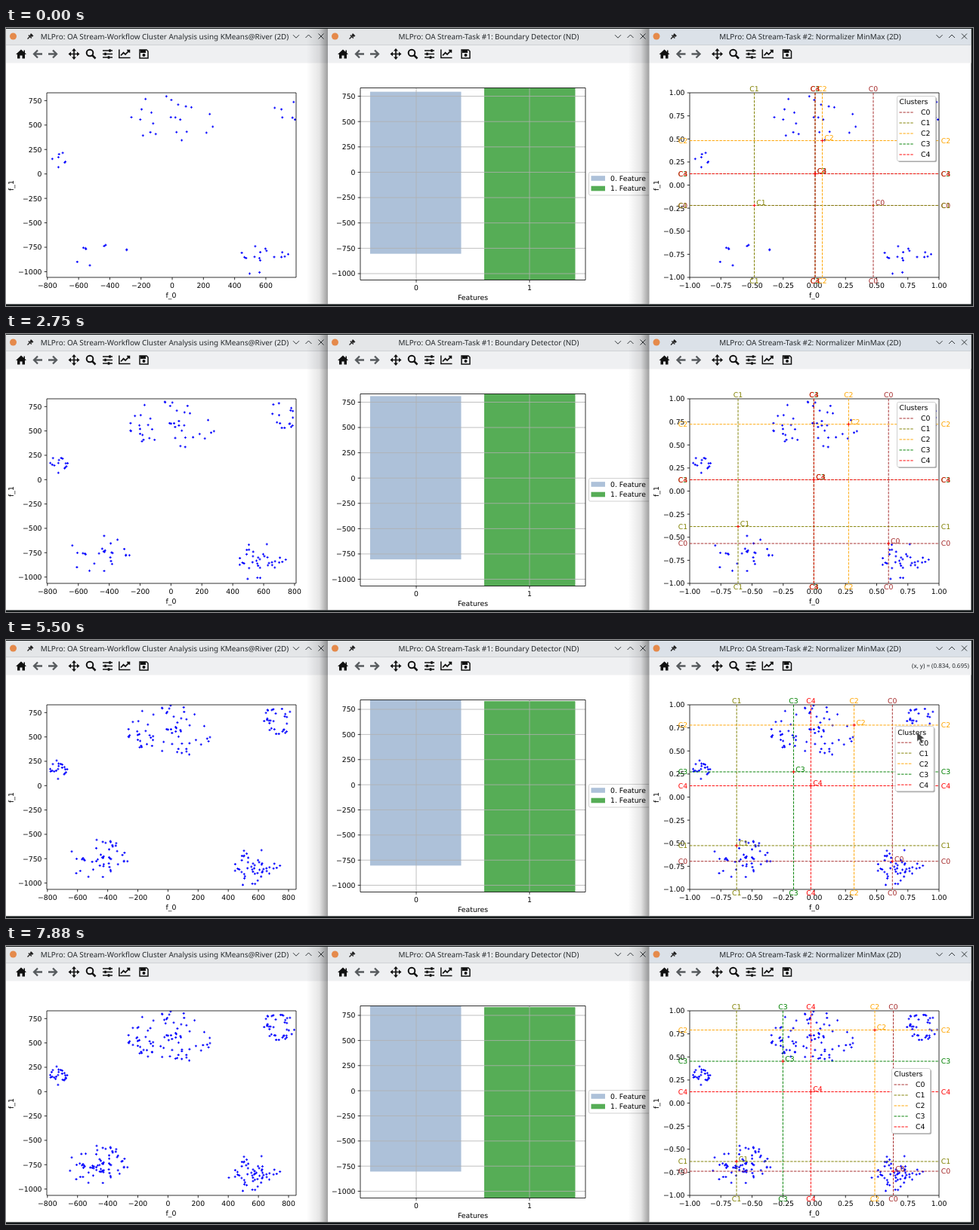
These frames come from a looping animation (1280x369 px, 8000 ms). An HTML page:

```html
<!DOCTYPE html>
<html lang="en">
<head>
<meta charset="utf-8">
<title>Stream cluster analysis</title>
<style>
html, body { margin: 0; width: 100%; height: 100%; overflow: hidden; background: #14191a; }
svg { display: block; width: 1280px; height: 369px; font: 9.3px "DejaVu Sans", sans-serif; text-rendering: geometricPrecision; }
.title { font: 9.9px "Noto Sans", sans-serif; fill: #24282b; }
.coord { font: 8px "Noto Sans", sans-serif; fill: #24282b; }
.axis { fill: none; stroke: #000; stroke-width: .8; }
.grid { fill: none; stroke: #b0b0b0; stroke-width: .8; }
.dots { fill: none; stroke: #00f; stroke-width: 1.1; }
.dash { fill: none; stroke-width: .95; stroke-dasharray: 3.44 1.49; }
.icon { fill: none; stroke: #111; stroke-width: 1.7; }
.icon .solid { fill: #111; stroke: none; }
.icon .dim { stroke: #575b5e; stroke-width: 2.3; }
.button { fill: none; stroke: #33383b; stroke-width: 1; }
</style>
</head>
<body>
<svg viewBox="0 0 1280 369">
  <defs>
    <linearGradient id="shade">
      <stop stop-color="#000" stop-opacity="0"/>
      <stop offset=".6" stop-color="#000" stop-opacity=".1"/>
      <stop offset="1" stop-color="#000" stop-opacity=".38"/>
    </linearGradient>
    <clipPath id="clipL"><rect x="54" y="86" width="330" height="245.5"/></clipPath>
    <clipPath id="clipM"><rect x="426" y="46" width="425" height="320"/></clipPath>
    <clipPath id="clipR"><rect x="905" y="86" width="330" height="245.5"/></clipPath>
    <g id="tools" class="icon">
      <path class="solid" transform="translate(20 34.5)" d="M-7 .5L0-6 3.5-2.8V-5H5v3.6L7 .5H5V6H1.5V2h-3v4H-5V.5z"/>
      <path class="dim" d="M48 34.5H37.5M42 29.5l-5 5 5 5M56 34.5h10.5M62 29.5l5 5-5 5"/>
      <path d="M84 34.5h12M90 28.5v12"/>
      <path class="solid" d="M90 27l3 3.5h-6zM90 42l3-3.5h-6zM82.5 34.5l3.5-3v6zM97.500 34.5l-3.5-3v6z"/>
      <circle cx="111" cy="33" r="4.3" stroke-width="2"/><path d="M114 36l4.500 4.500" stroke-width="2.5"/>
      <path d="M128 30h13M128 34.500h13M128 39h13" stroke-width="1.3"/>
      <path d="M137.5 28.2v3.6M131.5 32.7v3.6M136 37.2v3.6" stroke-width="2.6"/>
      <path d="M149.8 28.5v11h14.700" stroke-width="1.5"/><path d="M152 36.5l3.5-3.7 2.5 2.2 5-5.2M160 29.5h3.4v3.3"/>
      <path d="M177 29h9l2 2v9h-11z" stroke-width="1.5"/><path class="solid" d="M178 29h7v4h-7zM180.5 36a2 2 0 1 0 4 0a2 2 0 1 0-4 0"/>
    </g>
    <g id="buttons" class="button"><path d="M380 9.2l4 4 4-4M396.5 13l4-4 4 4M413.5 7.5l7 7M420.5 7.5l-7 7"/></g>
  </defs>
  <g id="chrome"></g>
  <g id="plots"></g>
  <rect x="398" y="1" width="28" height="365.5" fill="url(#shade)"/>
  <rect x="823.5" y="1" width="28" height="365.5" fill="url(#shade)"/>
</svg>
<script>
const STEP = 125, LOOP = 8000, LAST = LOOP / STEP - 1;
const chrome = document.getElementById('chrome'), plots = document.getElementById('plots');
const minus = v => String(v).replace('-', '\u2212');
const text = (x, y, s, anchor = 'middle', extra = '') =>
  `<text x="${x}" y="${y + 3.4}" text-anchor="${anchor}" ${extra}>${s}</text>`;
const rect = (x, y, w, h, extra) => `<rect x="${x}" y="${y}" width="${w}" height="${h}" ${extra}/>`;
const path = (d, cls, extra = '') => `<path class="${cls}" d="${d}" ${extra}/>`;
const range = (from, to, by) => Array.from({ length: Math.floor((to - from) / by + 1e-6) + 1 }, (_, i) => from + i * by);
const sideways = (x, y, s) => text(x, y, s, 'middle', `transform="rotate(-90 ${x} ${y})"`);

// Smooth 0 to 1 between two steps
function ramp(step, from, to) {
  const u = Math.min(1, Math.max(0, (step - from) / (to - from)));
  return u * u * (3 - 2 * u);
}
// Running mean settling from a to b
const settle = (a, b, step, tau) => a + (b - a) * (1 - Math.exp(-step / tau)) / (1 - Math.exp(-LAST / tau));
const latest = (rows, step) => rows.filter(r => r[0] <= step).pop()[1];

// Window frames
const windows = [
  [0, 210, '#e4e6e8', 'MLPro: OA Stream-Workflow Cluster Analysis using KMeans@River (2D)'],
  [426, 639, '#e4e6e8', 'MLPro: OA Stream-Task #1: Boundary Detector (ND)'],
  [851.5, 1064.5, '#dbe1e8', 'MLPro: OA Stream-Task #2: Normalizer MinMax (2D)']
];
chrome.innerHTML = windows.map(([x, mid, fill, name]) =>
  rect(x, 1, 426, 365.5, 'fill="#fff"') + rect(x, 1, 426, 22, `fill="${fill}"`) + rect(x, 23, 426, 23.5, 'fill="#eff0f2"') +
  path(`M${x} 22.5h426`, '', 'stroke="#c8cbce" stroke-width=".7"') +
  `<circle cx="${x + 9.5}" cy="11" r="4.5" fill="#e58a4b"/>` +
  path(`M${x + 28.5} 14.5l3-3M${x + 29.8} 9.5l4 4M${x + 32} 11l2.5-2.5`, '', 'stroke="#222" stroke-width="1.3"') +
  path(`M${x + 33} 7l3.5 3.5-2.5 1.5-2.5-2.5z`, '', 'fill="#222"') +
  text(mid, 12, name, 'middle', 'class="title"') +
  `<use href="#tools" x="${x}"/><use href="#buttons" x="${x}"/>`).join('');

// Stream of points in the pixels of the first view
const START = 62, PER_STEP = 3.3;
const clusters = [
  { share: .34, cx: 223, cy: 121, rx: 60, ry: 35, fall: .6 },
  { share: .13, cx: 371, cy: 107, rx: 25, ry: 19, fall: .6 },
  { share: .08, cx: 70, cy: 172, rx: 14, ry: 13, fall: .6 },
  { share: .24, cx: 122, cy: 292, rx: 45, ry: 28, fall: .7 },
  { share: .21, cx: 338, cy: 304, rx: 40, ry: 27, fall: 1 }
];
let seed = 11;
const rnd = () => (seed = (seed * 16807) % 2147483647) / 2147483647;
function newPoint() {
  let pick = rnd();
  const c = clusters.find(k => (pick -= k.share) <= 0) || clusters[0];
  const a = rnd() * 2 * Math.PI, r = rnd() ** c.fall;
  return [c.cx + c.rx * r * Math.cos(a), c.cy + c.ry * r * Math.sin(a)];
}
const points = Array.from({ length: START + Math.ceil(LAST * PER_STEP) }, newPoint);

// Data limits that widen as the stream runs
const XMIN = -804, YMAX = 830;
const xLimit = [[0, 794], [8, 810], [27, 830], [35, 850]];
const yLimit = [[0, -1058], [16, -1065]];
const xScale = step => (794 - XMIN) / (latest(xLimit, step) - XMIN);
const yScale = step => (YMAX + 1058) / (YMAX - latest(yLimit, step));

// Cluster centres C0 to C4
const originX = s => 905 + 166 * xScale(s);
const centres = [
  ['#a52a2a', s => [settle(1148, 1174.5, s, 16), settle(235.5, 299, s, 22)]],
  ['#808000', s => [settle(990.5, 967, s, 9), settle(235.5, 286, s, 150)]],
  ['#ffa500', s => [settle(1080.5, 1124, s, 14) + 26 * ramp(s, 49, LAST), settle(149.5, 111.5, s, 15)]],
  ['#008000', s => [originX(s) - 37 * ramp(s, 33, 52), 193.5 - 18.5 * ramp(s, 25, 44) - 22 * ramp(s, 49, LAST)]],
  ['#ff0000', s => [originX(s), 193.5]]
];
const drag = step => ramp(step, 40, 50.3);

function axes(x, y, w, h, xs, ys) {
  const ticks = xs.map(([p]) => `M${p} ${y + h}v3.3`).join('') + ys.map(([p]) => `M${x} ${p}h-3.3`).join('');
  return path(`M${x} ${y}h${w}v${h}h${-w}z` + ticks, 'axis') +
    xs.map(([p, s]) => text(p, y + h + 10.5, s)).join('') +
    ys.map(([p, s]) => text(x - 6.5, p, s, 'end')).join('');
}

const dots = (list, shift) => path(list.map(([x, y]) =>
  `M${(x + shift - 1.5).toFixed(1)} ${y.toFixed(1)}h3m-1.5-1.5v3`).join(''), 'dots');

function streamPlot(step, shown) {
  const xmax = latest(xLimit, step), ymin = latest(yLimit, step);
  const X = v => 54 + (v - XMIN) * 330 / (xmax - XMIN);
  const Y = v => 86 + (YMAX - v) * 245 / (YMAX - ymin);
  return `<g clip-path="url(#clipL)">${dots(shown, 0)}</g>` +
    axes(54, 86, 330, 245, range(-800, xmax, 200).map(v => [X(v), minus(v)]),
      range(-1000, 750, 250).map(v => [Y(v), minus(v)])) +
    text(218.5, 355, 'f_0') + sideways(7, 209, 'f_1');
}

function boundaryPlot(step) {
  const top = step < 35 ? 832 : 844, low = step < 16 ? -1063 : -1067;
  const Y = v => 79.5 + (top - v) * 255 / (top - low);
  const ys = range(-1000, 750, 250).map(v => [Y(v), minus(v)]);
  const bar = (x, hi, lo, fill) => rect(x, Y(hi), 120.5, Y(lo) - Y(hi), `fill="${fill}"`);
  const blue = '#adc1d9', green = '#56ad56';
  const key = (y, fill, s) => rect(774.5, y - 3.3, 18.5, 6.6, `fill="${fill}"`) + text(800, y, s, 'start');
  return bar(482, Math.min(top, latest(xLimit, step)), XMIN, blue) + bar(633, 832, low, green) +
    path(ys.map(([p]) => `M469 ${p}h298`).join('') + 'M543 79.5v255M693 79.5v255', 'grid') +
    axes(469, 79.5, 298, 255, [[543, 0], [693, 1]], ys) + text(618, 357.5, 'Features') +
    `<g clip-path="url(#clipM)">` + rect(771.5, 191.5, 90, 30.5, 'rx="2" fill="#fff" stroke="#ccc" stroke-width=".9"') +
    key(199.5, blue, '0. Feature') + key(213, green, '1. Feature') + '</g>';
}

function clusterMark(i, color, [x, y]) {
  const label = (lx, ly) => text(lx, ly, 'C' + i, 'middle', `fill="${color}"`);
  return path(`M${x} 331V86M905 ${y}H1235`, 'dash', `stroke="${color}"`) +
    path(`M${x - 2} ${y}h4M${x} ${y - 2}v4`, '', 'stroke="#f00" stroke-width="1"') +
    label(x, 80.5) + label(x, 335.5) + label(896, y) + label(1244, y) + label(x + 9, y - 3.5);
}

function legend(step) {
  const d = drag(step);
  return `<g transform="translate(${-7 * d} ${72 * d})">` +
    rect(1181, 92, 51, 86, 'rx="2" fill="#808080" fill-opacity=".65"') +
    rect(1179.5, 90.5, 51, 86, 'rx="2" fill="#fff" stroke="#ccc" stroke-width=".9"') +
    text(1201.5, 98, 'Clusters') +
    centres.map(([c], i) => path(`M1182.5 ${112 + i * 14}h19`, 'dash', `stroke="${c}"`) +
      text(1211, 112 + i * 14, 'C' + i, 'start')).join('') + '</g>';
}

function cursor(step) {
  if (step < 36 || step > 52) return '';
  const u = .855 - .064 * drag(step), v = .884 - .565 * drag(step);
  const x = 903.5 + (u + 1) * 165, y = 85 + (1 - v) * 122.5;
  return text(1275, 34, `(x, y) = (${u.toFixed(3)}, ${v.toFixed(3)})`, 'end', 'class="coord"') +
    path(`M${x} ${y}v12l3-2.2 2.5 5 2.5-1.200-2.4-4.8 3.8-.6z`, '',
      'fill="#444" stroke="#ddd" stroke-width=".4"');
}

function normalizedPlot(step, shown) {
  const label = v => minus(v.toFixed(2)), ticks = range(-1, 1, .25);
  return `<g clip-path="url(#clipR)">${dots(shown, 851)}</g>` +
    axes(905, 86, 330, 245, ticks.map(v => [1070 + v * 165, label(v)]), ticks.map(v => [208.5 - v * 122.5, label(v)])) +
    text(1070, 355, 'f_0') + sideways(861, 209, 'f_1') +
    centres.map(([c, at], i) => clusterMark(i, c, at(step))).join('') + legend(step) + cursor(step);
}

function draw(step) {
  const kx = xScale(step), ky = yScale(step);
  const shown = points.slice(0, START + Math.floor(step * PER_STEP))
    .map(([x, y]) => [54 + (x - 54) * kx, 86 + (y - 86) * ky]);
  plots.innerHTML = streamPlot(step, shown) + boundaryPlot(step) + normalizedPlot(step, shown);
}

let current = -1;
function tick() {
  const step = Math.floor(performance.now() % LOOP / STEP);
  if (step !== current) draw(current = step);
  requestAnimationFrame(tick);
}
tick();
</script>
</body>
</html>
```
